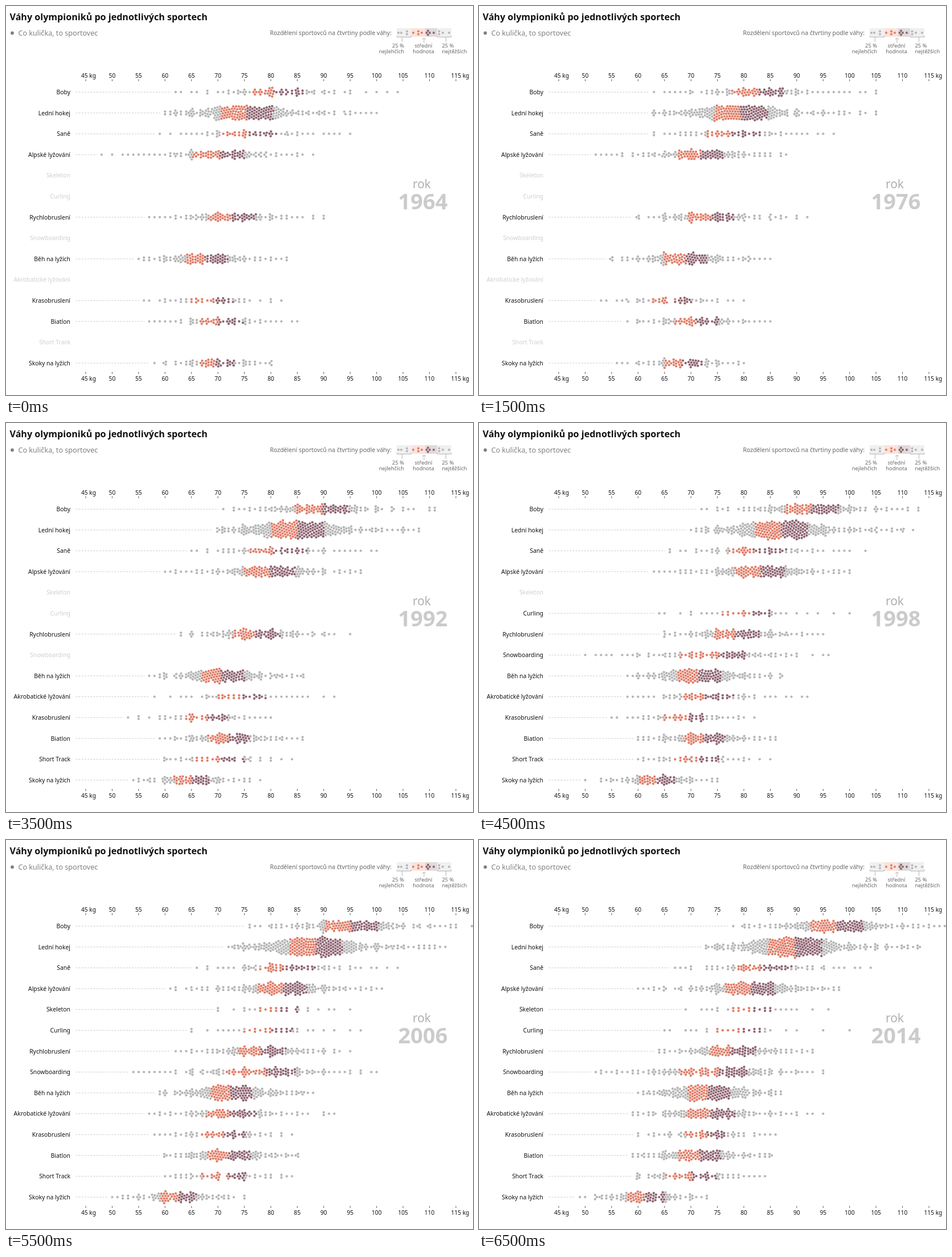
Write an HTML page with a canvas that moves like this. It is 820 by 683 pixels and loops after 8000 ms.

```html
<!DOCTYPE html>
<html lang="cs">
<head>
<meta charset="utf-8">
<title>Váhy olympioniků</title>
<style>
  html, body { margin: 0; width: 100%; height: 100%; overflow: hidden; background: #fff; }
  canvas { display: block; width: 820px; height: 683px; }
</style>
</head>
<body>
<canvas id="chart"></canvas>
<script>
const W = 820, H = 683, LOOP = 8000, STEP = 500;
const GAMES = [1964, 1968, 1972, 1976, 1980, 1984, 1988, 1992, 1994, 1998, 2002, 2006, 2010, 2014];
const LAST = GAMES[GAMES.length - 1];
const GREY = '#b6b6b6', ORANGE = '#e07e69', PURPLE = '#8f6572';
const QUARTERS = [GREY, ORANGE, PURPLE, GREY];
const FONT = '"Noto Sans", "Open Sans", sans-serif';
const DOT = 2.15, GAP = 4.8;

const kgX = kg => 140 + (kg - 45) * 9.286;
const rowY = i => 151.2 + i * 36.6;

// medians: key values spread evenly from the first games to the last
// count:   athletes at the first and the last games
// quart, reach: kg from the median to the quartiles and to the extremes
const sports = [];
const sport = (name, since, medians, count, quart, reach) =>
  sports.push({ name, since, medians, count, quart, reach });

sport('Boby', 1964, [81.2, 83.5, 92.5, 97.5], [76, 170], [4.8, 5], [19, 22]);
sport('Lední hokej', 1964, [75.5, 80.8, 87, 89.7], [210, 296], [4.7, 4.8], [16, 24]);
sport('Saně', 1964, [75.8, 78, 82, 83], [60, 72], [4.5, 5.8], [16, 20]);
sport('Alpské lyžování', 1964, [70.5, 72.5, 83.3, 81.5], [104, 176], [4.8, 4.3], [21, 17]);
sport('Skeleton', 2002, [81.5, 81.5], [28, 28], [4, 4], [11, 14]);
sport('Curling', 1998, [81.5, 79.8], [40, 28], [5.5, 3.5], [17, 18]);
sport('Rychlobruslení', 1964, [72.4, 74, 78.4, 77.6], [96, 114], [4, 4.6], [14.5, 17]);
sport('Snowboarding', 1998, [75.7, 79.2, 75.6], [96, 140], [7.5, 5], [25, 20]);
sport('Běh na lyžích', 1964, [67.5, 69.2, 71.3, 73], [110, 188], [3.5, 4.3], [13, 15]);
sport('Akrobatické lyžování', 1992, [74.2, 71.6, 73.4], [44, 128], [4.2, 5], [15, 19]);
sport('Krasobruslení', 1964, [69.2, 66, 69.2, 73.4], [44, 64], [4.5, 3.5], [14, 13]);
sport('Biatlon', 1964, [70.2, 71.2, 72.4, 71.6], [60, 128], [3.8, 4], [13, 15]);
sport('Short Track', 1992, [70.4, 72.3, 70.5], [42, 66], [4.5, 3.8], [12, 13]);
sport('Skoky na lyžích', 1964, [69.5, 68, 63.4, 61.2], [64, 100], [3.1, 3.6], [11.5, 12.5]);

function random(seed) {
  return () => {
    seed = seed + 0x6d2b79f5 | 0;
    let t = Math.imul(seed ^ seed >>> 15, 1 | seed);
    t = t + Math.imul(t ^ t >>> 7, 61 | t) ^ t;
    return ((t ^ t >>> 14) >>> 0) / 4294967296;
  };
}

function along(keys, f) {
  const p = f * (keys.length - 1);
  const i = Math.min(keys.length - 2, Math.floor(p));
  return keys[i] + (keys[i + 1] - keys[i]) * (p - i);
}

// Reported weights are whole kilos and favour multiples of five.
function reported(kg, rnd) {
  const whole = Math.round(kg + (rnd() - 0.5) * 0.8);
  const five = Math.round(whole / 5) * 5;
  return Math.abs(whole - five) === 1 && rnd() < 0.3 ? five : whole;
}

// One half of the athletes: an even inner quarter, then a thinning tail.
function half(median, side, quart, reach, m, rnd) {
  const tail = reach * (0.92 + rnd() * 0.16) - quart;
  const slope = Math.min(0.95, 1.1 * quart / tail);
  const out = [];
  for (let i = 0; i < m; i++) {
    const u = (i + 1) / m;
    out.push(quart * (u - 0.5 / m), quart + tail * (slope * u + (1 - slope) * u ** 3));
  }
  return out.map(d => reported(median + side * d, rnd));
}

function weights({ since, medians, count, quart, reach }, year, rnd) {
  const f = (year - since) / (LAST - since);
  const median = along(medians, f), m = Math.round(along(count, f) / 4);
  return [-1, 1].flatMap((side, k) => half(median, side, quart[k], reach[k], m, rnd));
}

// Pull every dot to its weight and the row axis, push overlaps apart.
function swarm(values, rnd) {
  const steps = 130;
  const dots = values.map(kg => {
    const home = kgX(kg);
    return { home, x: home + (rnd() - 0.5) * 0.4, y: (rnd() - 0.5) * 14 };
  });
  for (let k = 0; k < steps; k++) {
    const pull = Math.max(0, 1 - k / (steps - 10));
    for (const d of dots) {
      d.x += (d.home - d.x) * 0.12 * pull;
      d.y -= d.y * 0.07 * pull;
    }
    dots.sort((p, q) => p.x - q.x);
    for (let i = 0; i < dots.length; i++) {
      const p = dots[i];
      for (let j = i + 1; j < dots.length && dots[j].x - p.x < GAP; j++) {
        const q = dots[j], dx = q.x - p.x, dy = q.y - p.y;
        const dist = Math.hypot(dx, dy) || 0.01;
        if (dist >= GAP) continue;
        const push = (GAP - dist) / dist * 0.45;
        p.x -= dx * push; p.y -= dy * push;
        q.x += dx * push; q.y += dy * push;
      }
    }
  }
  return dots.sort((p, q) => p.x - q.x);
}

const cache = {};
function layout(year) {
  return cache[year] ||= sports.map((s, i) => {
    if (year < s.since) return null;
    const rnd = random(year * 31 + i);
    return swarm(weights(s, year, rnd), rnd);
  });
}

const canvas = document.getElementById('chart');
const ctx = canvas.getContext('2d');
const dpr = window.devicePixelRatio || 1;
canvas.width = W * dpr;
canvas.height = H * dpr;

function text(str, x, y, size, color, align = 'left', weight = 400) {
  ctx.font = `${weight} ${size}px ${FONT}`;
  ctx.textAlign = align;
  ctx.fillStyle = color;
  ctx.fillText(str, x, y);
}

function dot(x, y, color, r = DOT) {
  ctx.fillStyle = color;
  ctx.beginPath();
  ctx.arc(x, y, r, 0, Math.PI * 2);
  ctx.fill();
}

function line(points, color, dash = []) {
  ctx.strokeStyle = color;
  ctx.lineWidth = 1;
  ctx.setLineDash(dash);
  ctx.beginPath();
  points.forEach(([x, y]) => ctx.lineTo(x, y));
  ctx.stroke();
}

function box(x, w, color) {
  ctx.fillStyle = color;
  ctx.fillRect(x, 39, w, 15);
}

function drawLegend() {
  text('Rozdělení sportovců na čtvrtiny podle váhy:', 677, 51, 10.5, '#666', 'right', 500);
  box(686, 25.5, '#f0f0f0');
  box(711.5, 24.5, '#fae3dc');
  box(736, 21, '#dfdadb');
  box(757, 25, '#f0f0f0');
  const marks = [
    [GREY, [689, 47], [694, 47], [704, 44.5], [704, 49.5]],
    [ORANGE, [715, 47], [724, 44.5], [724, 49.5], [730, 47]],
    [PURPLE, [741, 43.5], [738.5, 47], [744, 47], [741, 50.5], [751, 47]],
    [GREY, [760.5, 44.5], [760.5, 49.5], [767, 47], [778, 47]]
  ];
  for (const [color, ...spots] of marks) spots.forEach(([x, y]) => dot(x, y, color, 2));
  const rule = '#b5b5b5';
  for (const [l, r, stem] of [[686.5, 711.5, 695.5], [757.5, 782, 772.5]]) {
    line([[l, 52], [l, 54.5], [r, 54.5], [r, 52]], rule);
    line([[stem, 54.5], [stem, 63]], rule);
  }
  line([[734, 56], [734, 65]], rule);
  line([[731, 59], [734, 56], [737, 59]], rule);
  const note = (a, b, x, align) => {
    text(a, x, 73, 9.4, '#666', align);
    text(b, x, 82.5, 9.4, '#666', align);
  };
  note('25 %', 'nejlehčích', 699, 'right');
  note('střední', 'hodnota', 733, 'center');
  note('25 %', 'nejtěžších', 765.5, 'left');
}

function drawAxes() {
  for (let kg = 45; kg <= 115; kg += 5) {
    const x = kgX(kg), first = kg === 45, last = kg === 115;
    for (const [tick, base] of [[128.5, 126], [642.5, 657.5]]) {
      line([[x, tick], [x, tick + 3.5]], '#555');
      if (first || last) text(kg + ' kg', first ? 132 : 781.5, base, 10.2, '#111', 'left', 500);
      else text(kg, x, base, 10.2, '#111', 'center', 500);
    }
  }
}

function drawRows(year) {
  layout(year).forEach((dots, i) => {
    const y = rowY(i);
    text(sports[i].name, 113, y + 3.7, 10.4, dots ? '#111' : '#cfcfcf', 'right', 500);
    if (!dots) return;
    line([[122.5, y], [dots[0].x - 8, y]], '#cacaca', [3, 2.2]);
    dots.forEach((d, k) => dot(d.x, y + d.y, QUARTERS[Math.floor(k * 4 / dots.length)]));
  });
}

function draw(year) {
  ctx.setTransform(dpr, 0, 0, dpr, 0, 0);
  ctx.fillStyle = '#fff';
  ctx.fillRect(0, 0, W, H);
  text('Váhy olympioniků po jednotlivých sportech', 6.5, 24.5, 16.1, '#111', 'left', 600);
  dot(11, 47.5, '#808080', 2.9);
  text('Co kulička, to sportovec', 21.5, 52, 12.6, '#808080');
  drawLegend();
  drawAxes();
  drawRows(year);
  text('rok', 730, 320, 21, '#b0b0b0', 'center', 300);
  text(year, 688.5, 357, 38, '#cbcbcb', 'left', 700);
}

let shown = -1;
function frame() {
  const t = performance.now() % LOOP;
  const index = Math.min(GAMES.length - 1, Math.floor(t / STEP));
  if (index !== shown) draw(GAMES[shown = index]);
  requestAnimationFrame(frame);
}
frame();
</script>
</body>
</html>
```
